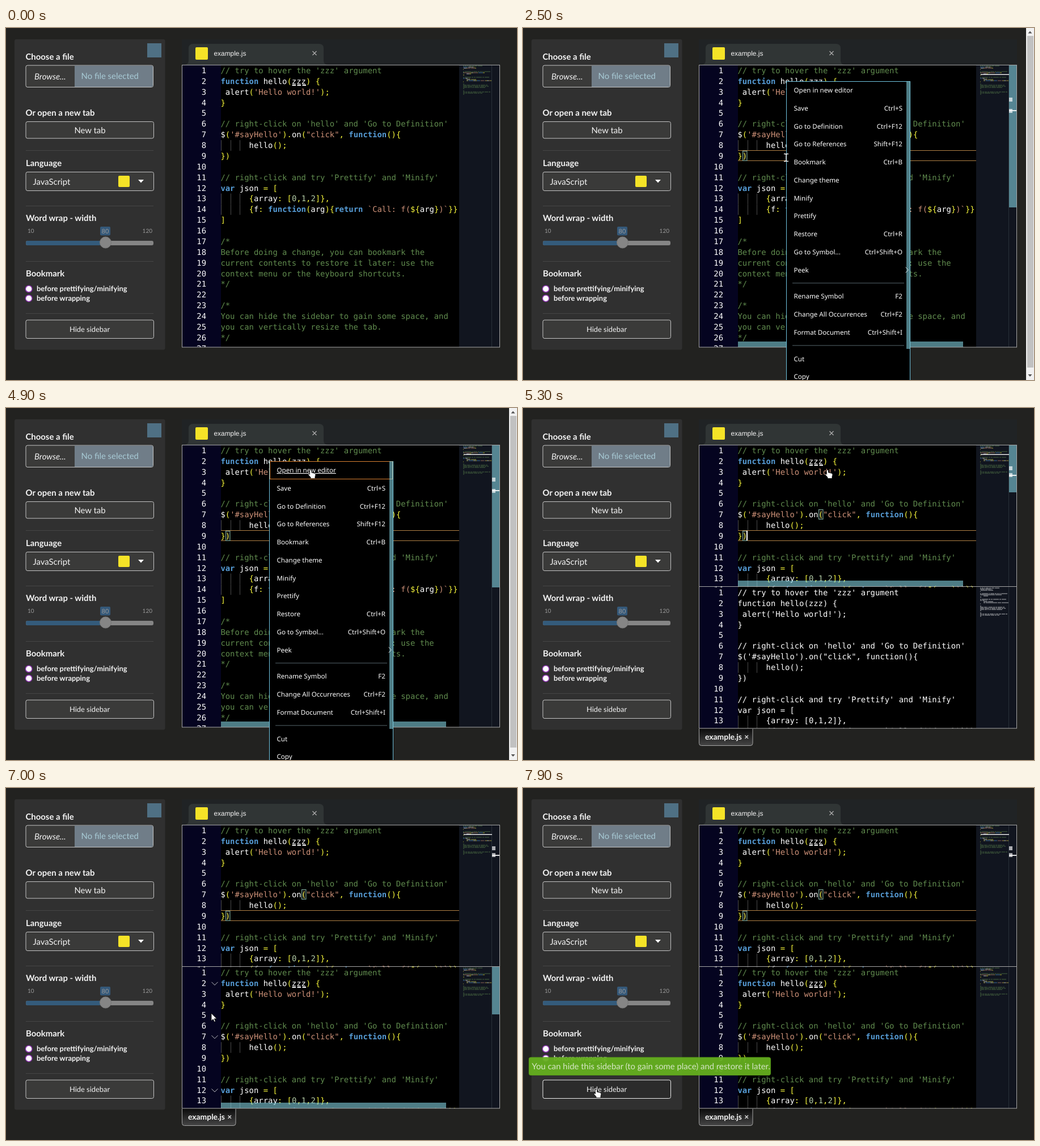
An HTML page for the animation above (8 s loop, 901 px wide and 622 px high).

```html
<!DOCTYPE html>
<html lang="en">
<head>
<meta charset="utf-8">
<title>Code editor</title>
<style>
html, body { margin: 0; width: 100%; height: 100%; overflow: hidden; background: #222220; }
svg { display: block; }
text { font-family: Lato, sans-serif; font-size: 14.9px; fill: #f4f4f4; white-space: pre; text-rendering: geometricPrecision; }
.b { font-weight: 700; }
.s { font-size: 12.9px; }
.mid { text-anchor: middle; }
.end { text-anchor: end; }
.tiny { font-size: 10px; fill: #999; }
.tab { font: 11.9px "Liberation Sans", Arial, sans-serif; }
.box { fill: #3a3a39; stroke: #c4c4c4; }
.box.hover { fill: #2b2b2b; stroke: #eee; }
.code text { font: 13.9px "DejaVu Sans Mono", monospace; fill: #fff; }
.map { fill: #fff; opacity: .6; }
.com { fill: #608b4e; }
.str { fill: #ce9178; }
.key { fill: #569cd6; font-weight: 700; }
.del { fill: #f4f43a; }
.num { fill: #b5cea8; }
.plain tspan, .plain .map rect { fill: #fff; font-weight: 400; }
.plain .hint { display: none; }
.bar { fill: #83d0e0; opacity: .6; }
.menu text { font: 11.6px "Noto Sans", sans-serif; fill: #fff; }
.menu .hot text { text-decoration: underline; }
.menu .hot rect { stroke: #d98032; }
.line { fill: none; stroke: #fff; }
.frame { fill: none; stroke: #a6a6a6; }
</style>
</head>
<body>
<svg id="stage" width="901" height="622" viewBox="0 0 901 622">
  <defs>
    <linearGradient id="tabFill" x1="0" y1="0" x2="0" y2="1">
      <stop offset="0" stop-color="#0c0c0c"/><stop offset="1" stop-color="#454545"/>
    </linearGradient>
  </defs>

  <!-- sidebar -->
  <rect x="15" y="20" width="265.500" height="548.500" rx="3" fill="#303030"/>
  <rect x="249" y="27" width="25" height="25" fill="#4f7084"/>
  <text class="b" x="34.500" y="55.500">Choose a file</text>
  <rect class="box" x="35" y="66" width="224.500" height="38.500" rx="3"/>
  <path d="M121 66.500H257Q259 66.500 259 68.500V102Q259 104 257 104H121Z" fill="#707d88"/>
  <text x="50" y="90.500" font-style="italic">Browse...</text>
  <text x="132.500" y="90" style="fill:#a8cbd6">No file selected</text>
  <text class="b" x="34.500" y="154.500">Or open a new tab</text>
  <rect class="box" x="35" y="165.500" width="225.500" height="29.500" rx="3"/>
  <text class="mid" x="148" y="185.500">New tab</text>
  <path d="M35 216.500H260M35 314.500H260M35 412.500H260M35 504.500H260" stroke="#464646"/>
  <text class="b" x="35" y="244">Language</text>
  <rect class="box" x="35" y="254.500" width="225.500" height="33" rx="3"/>
  <text x="47.500" y="276.500">JavaScript</text>
  <rect x="198" y="261" width="20" height="20" rx="2" fill="#f5e327"/>
  <path d="M233 268H243L238 273.500Z" fill="#fff"/>
  <text class="b" x="35" y="341">Word wrap - width</text>
  <text class="tiny" x="38" y="362">10</text>
  <text class="tiny end" x="258" y="362">120</text>
  <rect x="166" y="351" width="18" height="15.500" rx="2" fill="#35597a"/>
  <text class="tiny mid" x="175" y="363" style="font-size:11px">80</text>
  <rect x="35" y="376" width="225" height="8" rx="3" fill="#858585"/>
  <path d="M38 376H176V384H38Q35 384 35 380T38 376Z" fill="#345b7b"/>
  <circle cx="175.500" cy="379" r="10" fill="#858585" stroke="#777"/>
  <text class="b" x="35" y="439">Bookmark</text>
  <g fill="#fff" stroke="#8d35b0" stroke-width="1.500">
    <circle cx="40.200" cy="461" r="5.800"/><circle cx="40.200" cy="477.700" r="5.800"/>
  </g>
  <text class="b s" x="54" y="465">before prettifying/minifying</text>
  <text class="b s" x="54" y="482">before wrapping</text>
  <rect class="box" id="hide" x="35" y="516" width="225.500" height="32.500" rx="3"/>
  <text class="s mid" x="147.500" y="536.500">Hide sidebar</text>

  <!-- top tab -->
  <rect x="310" y="20" width="561" height="45" fill="#202325"/>
  <path d="M314 65Q322 65 322 57V36Q322 28 330 28H552Q560 28 560 36V57Q560 65 568 65Z" fill="#303535"/>
  <rect x="334" y="34" width="22" height="22" rx="2" fill="#f5e327"/>
  <text class="tab" x="366.500" y="49">example.js</text>
  <path d="M540.500 41L547.500 48M547.500 41L540.500 48" stroke="#b0b0b0" stroke-width="1.200"/>
</svg>
<script>
const stage = document.getElementById('stage');
const hideButton = document.getElementById('hide');
const CHAR = 8.37, ROW = 18.87, X0 = 378.4;
const LOOP = 8000, STEP = 100, SPLIT = 5300, MENU = 2500;
const timed = [];

function el(tag, attrs, parent, text) {
  const node = document.createElementNS('http://www.w3.org/2000/svg', tag);
  for (const k in attrs) node.setAttribute(k, attrs[k]);
  if (text !== undefined) node.textContent = text;
  parent.append(node);
  return node;
}
const rect = (x, y, width, height, attrs, parent) => el('rect', { x, y, width, height, ...attrs }, parent);
const within = (t, spans) => spans.some(([a, b]) => t >= a && t < b);
// show a node only during the given [from, to] spans
function during(node, ...spans) {
  timed.push({ node, spans });
  return node;
}

const source = `// try to hover the 'zzz' argument
function hello(zzz) {
 alert('Hello world!');
}

// right-click on 'hello' and 'Go to Definition'
$('#sayHello').on("click", function(){
      hello();
})

// right-click and try 'Prettify' and 'Minify'
var json = [
      {array: [0,1,2]},
      {f: function(arg){return \`Call: f(\${arg})\`}}
]

/*
Before doing a change, you can bookmark the
current contents to restore it later: use the
context menu or the keyboard shortcuts.
*/

/*
You can hide the sidebar to gain some space, and
you can vertically resize the tab.
*/
`.split('\n');

const TOKEN = /('[^']*'|"[^"]*"|`[^$]*|\)`)|\b(function|var|return)\b|(\$\{|[{}()[\];,.:=])|(\d)/g;
const KINDS = ['str', 'key', 'del', 'num'];

// one line as text, and as one bar per word in the overview
function codeLine(line, i, parent, map, comment) {
  const text = el('text', { x: X0, y: 14 + ROW * i }, parent);
  let at = 0;
  const put = (end, cls) => {
    const part = line.slice(at, end), attrs = cls ? { class: cls } : {};
    if (part) el('tspan', attrs, text, part);
    for (const w of part.matchAll(/\S+/g))
      rect(806 + at + w.index, .5 + i * 2, w[0].length, 1.1, attrs, map);
    at = end;
  };
  if (comment) return put(line.length, 'com');
  for (const m of line.matchAll(TOKEN)) {
    put(m.index);
    put(m.index + m[0].length, KINDS[m.slice(1).findIndex(Boolean)]);
  }
  put(line.length);
}

function editor(y, h, parent) {
  const root = el('svg', { x: 0, y, width: 901, height: h, class: 'code' }, parent);
  rect(311, 0, 68, h, { fill: '#050420' }, root);
  rect(379, 0, 420, h, { fill: '#000' }, root);
  rect(799, 0, 72, h, { fill: '#11151f' }, root);
  rect(856, 0, 1, h, { fill: '#283038' }, root);
  const code = el('g', {}, root);
  const map = el('g', { class: 'map' }, root);
  let block = false;
  source.forEach((line, i) => {
    if (line === '/*') block = true;
    codeLine(line, i, code, map, block || line.startsWith('//'));
    if (line === '*/') block = false;
    el('text', { x: 353, y: 14 + ROW * i, class: 'end' }, root, i + 1);
    if (line.startsWith('      '))
      for (let k = 0; k < 3; k++) rect(Math.round(379 + k * 2 * CHAR), ROW * i, 1, ROW, { fill: '#4a4a4a' }, root);
  });
  el('path', { d: 'M504.5 35H530', class: 'line hint', 'stroke-width': 2, 'stroke-dasharray': '6.500 2.500' }, root);
  return root;
}

// upper editor
const top1 = editor(66, 498, stage);
const active = during(el('g', {}, top1), [MENU, LOOP]);
el('path', { d: 'M379 150.500H799M379 168.500H799', stroke: '#b08045' }, active);
for (const [col, row] of [[17, 6], [1, 8]])
  rect(Math.round(X0 + col * CHAR) + .5, Math.round(row * ROW) + .5, 7.5, 17, { fill: '#ffffff18', stroke: '#7fae9f' }, active);
rect(807, 15.5, 50, 1.5, { fill: '#e8e8e8' }, active);
during(rect(394, 151, 2, 17, { fill: '#fff' }, top1), [5300, 6000], [6300, 6800], [7400, 7900]);

function bars(parent, y, h, thumb, vSpans, hSpans) {
  during(rect(857, y, 14, thumb, { class: 'bar' }, parent), ...vSpans);
  during(rect(379, y + h - 10, 397, 10, { class: 'bar' }, parent), ...hSpans);
}
bars(stage, 65, 499, 252, [[1100, SPLIT]], [[1100, SPLIT]]);
bars(stage, 65, 250, 84, [[SPLIT, 6900]], [[SPLIT, 6900]]);

function marks(a, b, caret, span) {
  const g = during(el('g', { fill: '#fff' }, stage), span);
  rect(857, a, 6, 7, { opacity: .65 }, g);
  rect(857, b, 6, 7, { opacity: .65 }, g);
  rect(857, caret, 14, 2, { opacity: .85 }, g);
}
marks(123, 143, 145, [MENU, SPLIT]);
marks(103, 115, 118, [SPLIT, LOOP]);
rect(310.5, 65.5, 560, 498.5, { class: 'frame' }, stage);

// lower editor
const low = during(el('g', {}, stage), [SPLIT, LOOP]);
const low1 = editor(316, 250, low);
low1.setAttribute('viewBox', '0 -1 901 250');
const folds = during(el('g', {}, low1), [7000, 7500]);
for (const row of [1, 6, 11])
  el('path', { d: `M362.500 ${row * ROW + 7}l5.500 5.500 5.500 -5.500`, class: 'line', opacity: .75 }, folds);
bars(low, 316, 250, 84, [[5500, 6000], [6900, 7600]], [[5500, 5700], [6900, 7600]]);
rect(310.5, 315.5, 560, 250.5, { class: 'frame' }, low);
el('path', { d: 'M310.500 567V592.500Q310.500 596.500 314.500 596.500H401Q405 596.500 405 592.500V567', fill: 'url(#tabFill)', stroke: '#a6a6a6' }, low);
el('text', { x: 321, y: 586, class: 'b', style: 'font-size:13.9px' }, low, 'example.js');
el('path', { d: 'M391.500 578.500l5.500 5.500m0 -5.500l-5.500 5.500', stroke: '#ddd', 'stroke-width': 1.4 }, low);

// page scrollbar and context menu
const popup = during(el('g', { class: 'menu' }, stage), [MENU, SPLIT]);
rect(887, 0, 14, 622, { fill: '#f1f1f1' }, popup);
rect(889, 14, 11, 586, { fill: '#c1c1c1' }, popup);
el('path', { d: 'M890.500 9.500H897.500L894 5.500ZM890.500 612H897.500L894 616Z', fill: '#505050' }, popup);
rect(464.5, 94.5, 218, 540, { fill: '#000', stroke: '#6fc3df' }, popup);
const entries = [
  'Open in new editor', 'Save|Ctrl+S', 'Go to Definition|Ctrl+F12', 'Go to References|Shift+F12',
  'Bookmark|Ctrl+B', 'Change theme', 'Minify', 'Prettify', 'Restore|Ctrl+R',
  'Go to Symbol...|Ctrl+Shift+O', 'Peek', '-', 'Rename Symbol|F2',
  'Change All Occurrences|Ctrl+F2', 'Format Document|Ctrl+Shift+I', '-', 'Cut', 'Copy'
];
const items = [];
let itemY = 94;
for (const entry of entries) {
  if (entry === '-') {
    rect(475, itemY + 7, 197, 1, { fill: '#56666c' }, popup);
    itemY += 15;
    continue;
  }
  const [label, keys = ''] = entry.split('|');
  const g = el('g', {}, popup);
  rect(465.5, itemY + .5, 216, 31, { fill: 'none' }, g);
  el('text', { x: 477.5, y: itemY + 20 }, g, label);
  el('text', { x: 669, y: itemY + 20, class: 'end' }, g, keys);
  items.push({ g, y: itemY });
  itemY += 31.75;
}
during(rect(676, 94, 7, 473, { class: 'bar' }, popup), [MENU, 3000], [3300, SPLIT]);
el('path', { d: 'M674.500 422.500L679.500 427.500L674.500 432.500', class: 'line', opacity: .8 }, popup);

// tooltip
const tip = el('g', {}, stage);
rect(10.5, 476, 426, 31.5, { rx: 3, fill: '#65b01e', stroke: '#589c18' }, tip);
el('text', { x: 15.5, y: 496.5, style: 'fill:#e2f3d2' }, tip, 'You can hide this sidebar (to gain some place) and restore it later.');

// pointers, hotspot at the origin
const pointers = {
  arrow: 'M0 0V13.500L3.200 10.600 5.300 15.300 7.400 14.400 5.300 9.800H9.600Z',
  hand: 'M-1.500 1.500Q0 -1 1.500 1.500V5L7 6.300Q9 7 9 9L8 12.500V15.500H0V13.500L-4 9Q-4.500 7 -2.500 7.500L-1.500 8.500Z',
  beam: 'M-4 -6.500H-1L0 -5.500 1 -6.500H4M0 -5.500V5.500M-4 6.500H-1L0 5.500 1 6.500H4'
};
for (const kind in pointers) {
  const style = kind === 'beam' ? { class: 'line', 'stroke-width': 1.3 } : { fill: '#fff', stroke: '#000', 'stroke-width': .8 };
  pointers[kind] = el('path', { d: pointers[kind], ...style }, stage);
}

// time, x, y, pointer from then on
const path = [
  [800, 189, 27, 'arrow'], [1100, 405, 184, 'beam'], [1200, 463, 226, 'beam'], [1300, 463, 226, 'beam'],
  [1500, 464, 229, 'beam'], [3200, 464, 229, 'beam'], [3300, 470, 222, 'hand'], [3500, 491, 191, 'hand'],
  [3800, 524, 133, 'hand'], [4100, 537, 110, 'hand'], [4800, 537, 110, 'hand'], [4900, 537, 109, 'hand'],
  [6200, 537, 109, 'hand'], [6300, 537, 135, 'beam'], [6400, 536, 159, 'beam'], [6600, 536, 159, 'beam'],
  [6700, 520, 190, 'beam'], [7000, 362, 398, 'arrow'], [7200, 343, 430, 'arrow'], [7300, 343, 430, 'arrow'],
  [7600, 190, 512, 'arrow'], [7700, 150, 526, 'hand'], [7800, 132, 531, 'hand'], [7900, 129, 532, 'hand']
];

function pointerAt(t) {
  const i = path.findLastIndex(p => p[0] <= t);
  if (i < 0) return null;
  const a = path[i], b = path[i + 1] || a;
  const k = b === a ? 0 : (t - a[0]) / (b[0] - a[0]);
  return { x: a[1] + (b[1] - a[1]) * k, y: a[2] + (b[2] - a[2]) * k, kind: a[3] };
}

function draw() {
  const t = Math.floor(performance.now() % LOOP / STEP) * STEP;
  for (const { node, spans } of timed) node.style.display = within(t, spans) ? '' : 'none';
  low1.classList.toggle('plain', t < 5400);

  const p = pointerAt(t);
  for (const kind in pointers) {
    const on = p && p.kind === kind;
    pointers[kind].style.display = on ? '' : 'none';
    if (on) pointers[kind].setAttribute('transform', `translate(${Math.round(p.x)} ${Math.round(p.y)})`);
  }
  for (const { g, y } of items)
    g.classList.toggle('hot', !!p && t >= 3300 && p.y >= y && p.y < y + 31.75);
  hideButton.classList.toggle('hover', t >= 7700);
  tip.style.opacity = Math.max(0, Math.min(.94, (t - 7600) / 300));
  requestAnimationFrame(draw);
}
draw();
</script>
</body>
</html>
```
